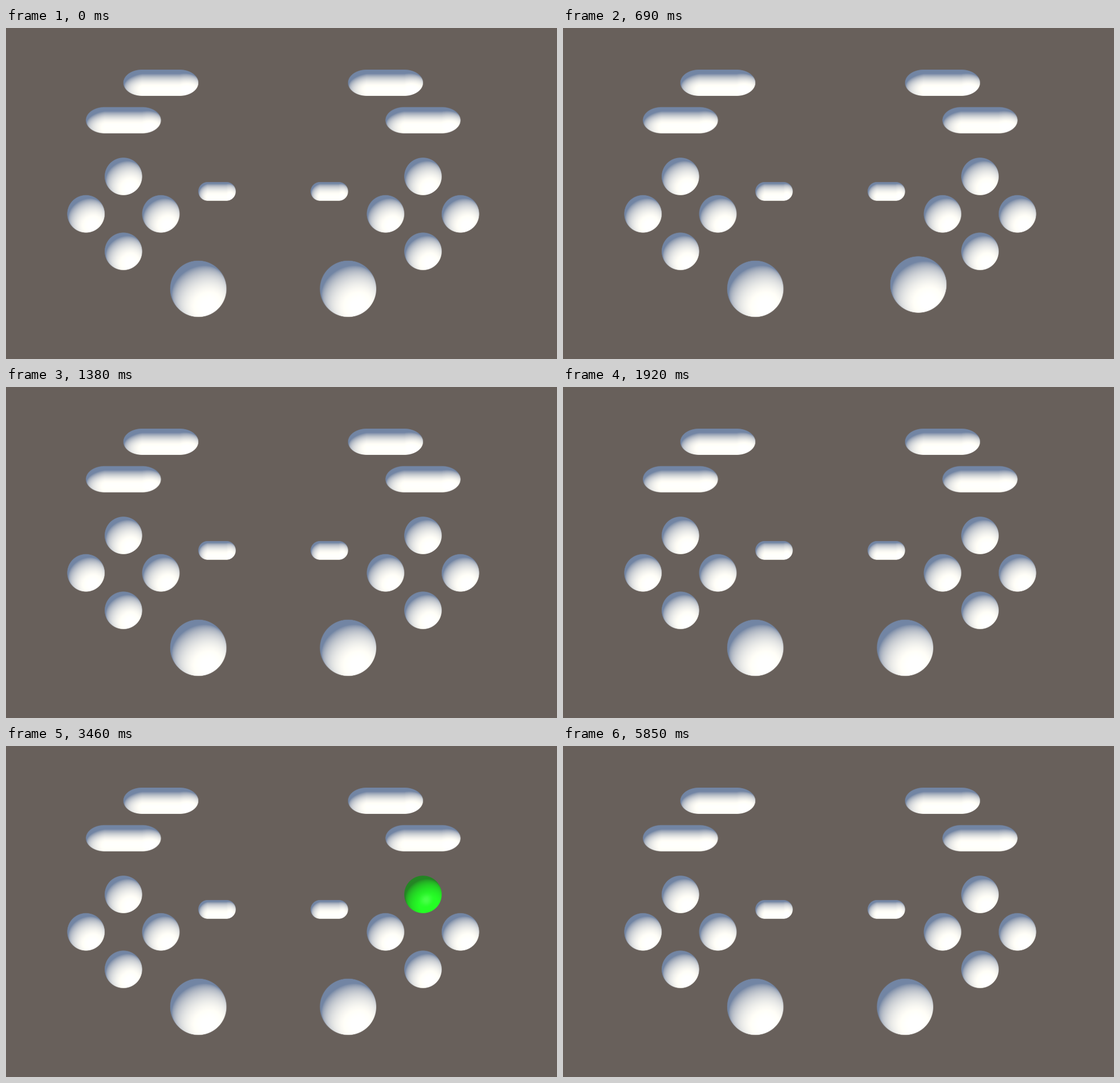
An HTML page with a canvas that plays this animation: 966x580 px, repeating every 5.92 s.

```html
<!DOCTYPE html>
<html lang="en">
<head>
<meta charset="utf-8">
<title>Gamepad</title>
<style>
  html, body { margin: 0; width: 100%; height: 100%; overflow: hidden; background: #68605b; }
  canvas { display: block; width: 966px; height: 580px; }
</style>
</head>
<body>
<canvas id="stage" width="966" height="580"></canvas>
<script>
const LOOP = 5920;
const UNIT = 65.65;
const ORIGIN = { x: 468.45, y: 457 };
const SCALE = 2;
const ctx = document.getElementById('stage').getContext('2d');
ctx.imageSmoothingQuality = 'high';

// Lighting in linear colour; screen axes, z towards the viewer.
const LIGHT = [0.321, 0.557, 0.766];
const HALF = [0.171, 0.296, 0.94];
const SUN = [0.95, 0.86, 0.64];
const SKY = [0.168, 0.235, 0.37];
const WHITE = [1, 1, 1];
const GREEN = [0, 1, 0];

const dot = (a, b) => a[0] * b[0] + a[1] * b[1] + a[2] * b[2];
const toSrgb = c => {
  c = Math.min(1, Math.max(0, c));
  return 255 * (c < 0.0031308 ? 12.92 * c : 1.055 * c ** (1 / 2.4) - 0.055);
};

function shade(normal, albedo) {
  const sun = Math.max(0, dot(normal, LIGHT));
  const rim = (1 - normal[2]) ** 3;
  const glint = 0.018 + 0.05 * Math.max(0, dot(normal, HALF)) ** 30;
  return albedo.map((a, i) =>
    toSrgb(a * (SKY[i] + sun * SUN[i] * (1 + 0.5 * rim)) + (a < 1 ? glint : 0)));
}

// A capsule lying along x; straight = 0 gives a sphere.
function renderCapsule({ rx, ry, straight }, albedo) {
  const halfW = rx + straight + 2, halfH = ry + 2;
  const sprite = document.createElement('canvas');
  const w = sprite.width = Math.ceil(halfW * 2 * SCALE);
  const h = sprite.height = Math.ceil(halfH * 2 * SCALE);
  const g = sprite.getContext('2d');
  const image = g.createImageData(w, h);
  for (let py = 0; py < h; py++) {
    for (let px = 0; px < w; px++) {
      const x = (px + 0.5 - w / 2) / SCALE, y = (py + 0.5 - h / 2) / SCALE;
      let u = Math.sign(x) * Math.max(0, Math.abs(x) - straight) / rx;
      let v = y / ry;
      const r = Math.hypot(u, v);
      const slope = r ? Math.hypot(u / rx, v / ry) / r : 1;
      const cover = Math.min(1, Math.max(0, (1 - r) / slope * SCALE + 0.5));
      if (!cover) continue;
      if (r > 1) { u /= r; v /= r; }
      const depth = Math.sqrt(Math.max(0, 1 - u * u - v * v));
      const n = [u / rx, v / ry, depth / rx];
      const len = Math.hypot(...n);
      const color = shade(n.map(c => c / len), albedo);
      image.data.set([...color, cover * 255], (py * w + px) * 4);
    }
  }
  g.putImageData(image, 0, 0);
  return sprite;
}

const makeKind = (rx, ry, straight) => {
  const shape = { rx: rx * UNIT, ry: ry * UNIT, straight: straight * UNIT };
  return { off: renderCapsule(shape, WHITE), on: renderCapsule(shape, GREEN) };
};
const ball = makeKind(0.5, 0.5, 0);
const stick = makeKind(0.75, 0.75, 0);
const pill = makeKind(0.5, 0.35, 0.5);
const dash = makeKind(0.25, 0.25, 0.25);

// Keys are [start, dx, dy, lit], each held until the next.
const press = (from, to) => [[from, 0, 0, true], [to, 0, 0, false]];
const push = (from, to, dx, dy) => [[from, dx, dy], [to, 0, 0]];

const parts = [
  { kind: pill, x: -3, y: -5.5, keys: [[2380, -UNIT, 0, true], [2540, -UNIT / 2, 0], [2610, 0, 0]] },
  { kind: pill, x: -4, y: -4.5, keys: press(1760, 1920) },
  { kind: pill, x: 3, y: -5.5, keys: [[1990, UNIT / 2, 0], [2070, UNIT, 0, true], [2220, 0, 0]] },
  { kind: pill, x: 4, y: -4.5, keys: press(1530, 1680) },

  { kind: ball, x: -4, y: -3, keys: push(4930, 5000, 0, -20) },
  { kind: ball, x: -5, y: -2, keys: push(3310, 3380, -20, 0) },
  { kind: ball, x: -3, y: -2, keys: push(5690, 5850, 20, 0) },
  { kind: ball, x: -4, y: -1, keys: push(3760, 3930, 0, 20) },

  { kind: ball, x: 4, y: -3, keys: press(3380, 3530) },
  { kind: ball, x: 3, y: -2, keys: press(3610, 3690) },
  { kind: ball, x: 5, y: -2, keys: press(2990, 3150) },
  { kind: ball, x: 4, y: -1, keys: press(3230, 3310) },

  { kind: dash, x: -1.5, y: -2.6, keys: press(4620, 4770) },
  { kind: dash, x: 1.5, y: -2.6, keys: press(4310, 4470) },

  { kind: stick, x: -2, y: 0, keys: [
    [1000, -19, 8], [1080, -8, -27], [1150, 29, -9], [1230, 16, 28], [1310, -8, 17], [1380, 0, 0]] },
  { kind: stick, x: 2, y: 0, keys: [
    [150, 2, 16], [230, -4, 31], [310, -25, 21], [380, -33, 0], [460, -26, -18],
    [540, -10, -25], [620, 9, -23], [690, 23.3, -7.5], [770, 17, 28], [840, 0, 0]] }
];

function draw(now) {
  const t = now % LOOP;
  ctx.fillStyle = '#68605b';
  ctx.fillRect(0, 0, 966, 580);
  for (const { kind, x, y, keys } of parts) {
    const [, dx, dy, lit] = keys.findLast(key => key[0] <= t) || [0, 0, 0];
    const sprite = lit ? kind.on : kind.off;
    const w = sprite.width / SCALE, h = sprite.height / SCALE;
    ctx.drawImage(sprite, ORIGIN.x + x * UNIT + dx - w / 2, ORIGIN.y + y * UNIT + dy - h / 2, w, h);
  }
  requestAnimationFrame(draw);
}
draw(0);
</script>
</body>
</html>
```
